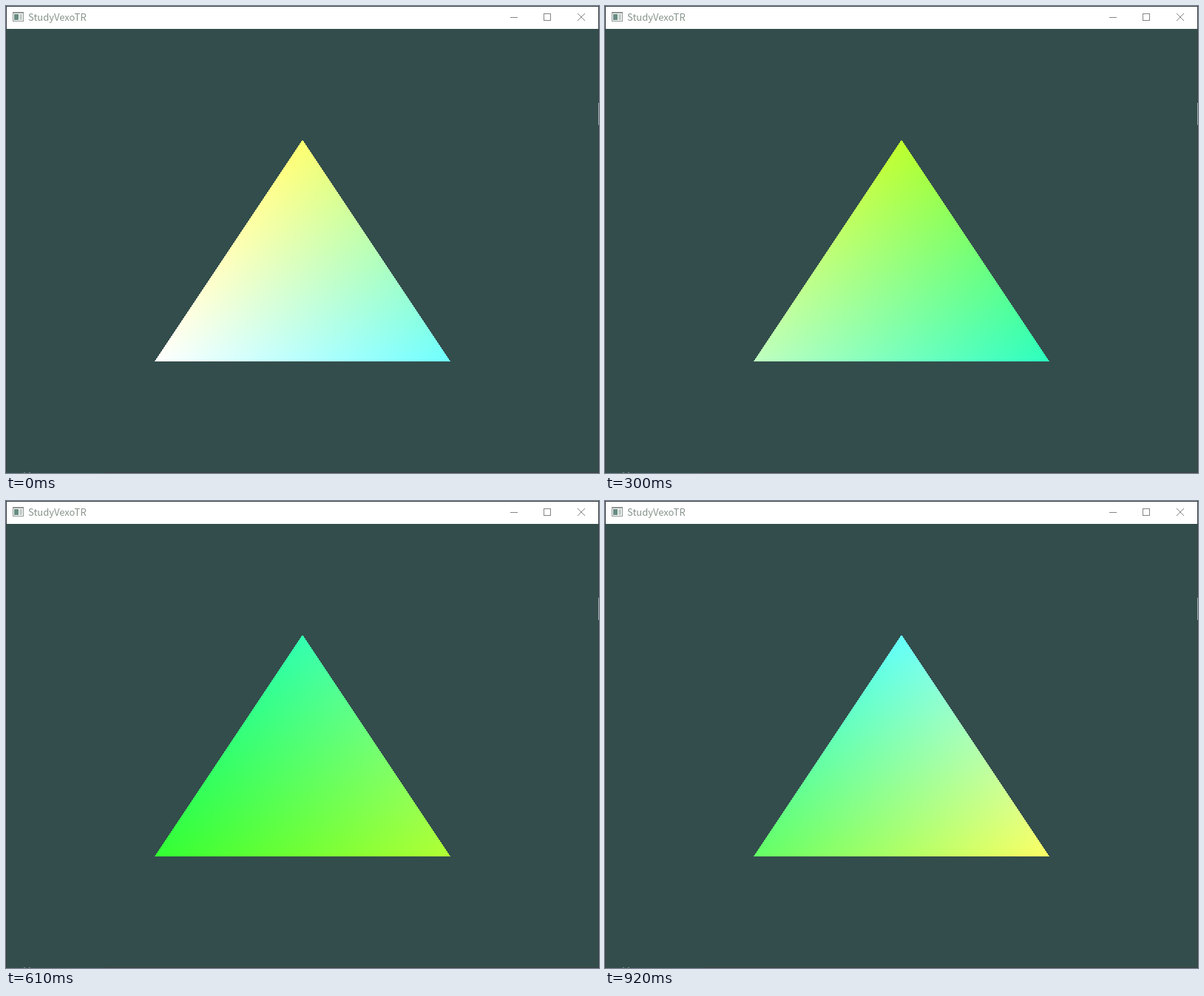
Recreate the animation shown at these times as an HTML page with a canvas. Size 802 by 632 pixels, loop 990 ms.

```html
<!DOCTYPE html>
<html lang="en">
<head>
<meta charset="utf-8">
<title>Triangle</title>
<style>
  html, body { margin: 0; width: 100%; height: 100%; overflow: hidden; background: #334d4c; }
  canvas { display: block; }
</style>
</head>
<body>
<canvas id="stage" width="802" height="632"></canvas>
<script>
const ctx = document.getElementById('stage').getContext('2d');
const LOOP = 990;
const STARTS = [0, 70, 150, 220, 300, 380, 450, 530, 610, 690, 760, 840, 920];

// Two channel levels, sampled evenly over the loop.
const BASE = [255, 237, 189, 130, 50, 25, 100];
const TINT = [110, 40, 45, 115, 179, 223, 252];

function rect(color, x, y, w, h) {
  ctx.fillStyle = color;
  ctx.fillRect(x, y, w, h);
}

function line(color, x1, y1, x2, y2) {
  ctx.strokeStyle = color;
  ctx.beginPath();
  ctx.moveTo(x1, y1);
  ctx.lineTo(x2, y2);
  ctx.stroke();
}

// Catmull-Rom curve through evenly spaced values.
function curve(values, pos) {
  const i = Math.min(Math.floor(pos), values.length - 2);
  const u = pos - i;
  const at = k => {
    if (k < 0) return 2 * values[0] - values[1];
    const last = values.length - 1;
    return k > last ? 2 * values[last] - values[last - 1] : values[k];
  };
  const [a, b, c, d] = [at(i - 1), at(i), at(i + 1), at(i + 2)];
  const v = b + 0.5 * u * (c - a + u * (2 * a - 5 * b + 4 * c - d + u * (3 * (b - c) + d - a)));
  return Math.max(0, Math.min(255, v));
}

const mix = (p, q, u) => p.map((v, i) => v + (q[i] - v) * u);
const rgb = c => `rgb(${c.map(Math.round).join(',')})`;

function drawTitleBar() {
  rect('#fff', 1, 1, 800, 30);

  // Window icon
  rect('#8f9693', 9, 8, 15, 13);
  rect('#fff', 10, 10, 13, 10);
  rect('#688c84', 11, 11, 6, 8);
  rect('#c3cfca', 18, 11, 4, 8);

  ctx.fillStyle = '#87948b';
  ctx.font = '13px "Noto Sans CJK SC", "Noto Sans CJK JP", "Noto Sans", sans-serif';
  ctx.fillText('StudyVexoTR', 30, 20);

  const ink = '#858585';
  ctx.lineWidth = 1;
  rect(ink, 682, 15, 10, 1);
  ctx.strokeStyle = ink;
  ctx.strokeRect(727.5, 10.5, 9, 9);
  line(ink, 773, 10, 783, 20);
  line(ink, 783, 10, 773, 20);
}

function drawWindow() {
  rect('#334d4c', 0, 0, 802, 632);
  drawTitleBar();
  const edge = '#3b4141';
  rect(edge, 0, 0, 802, 1);
  rect(edge, 0, 0, 1, 632);
  rect(edge, 801, 0, 1, 632);
  rect('#a5aaa8', 801, 131, 1, 30);
  rect(edge, 132, 631, 670, 1);
  rect('#788683', 24, 631, 2, 1);
  rect('#788683', 31, 631, 2, 1);
}

// Horizontal spans keep the edges hard and the blend linear.
function drawTriangle(time) {
  const pos = time / 920 * (BASE.length - 1);
  const base = curve(BASE, pos);
  const tint = curve(TINT, pos);
  const top = [base, 255, tint];
  const left = [base, 255, base];
  const right = [tint, 255, base];

  for (let row = 0; row < 300; row++) {
    const u = (row + 0.5) / 300;
    const x1 = 401 - 200 * u;
    const x2 = 401 + 200 * u;
    const blend = ctx.createLinearGradient(x1, 0, x2, 0);
    blend.addColorStop(0, rgb(mix(top, left, u)));
    blend.addColorStop(1, rgb(mix(top, right, u)));
    const start = Math.round(x1);
    rect(blend, start, 181 + row, Math.round(x2) - start, 1);
  }
}

let shown = -1;
function tick() {
  const now = performance.now() % LOOP;
  const time = STARTS.filter(start => start <= now).pop();
  if (time !== shown) {
    shown = time;
    drawWindow();
    drawTriangle(time);
  }
  requestAnimationFrame(tick);
}
tick();
</script>
</body>
</html>
```
